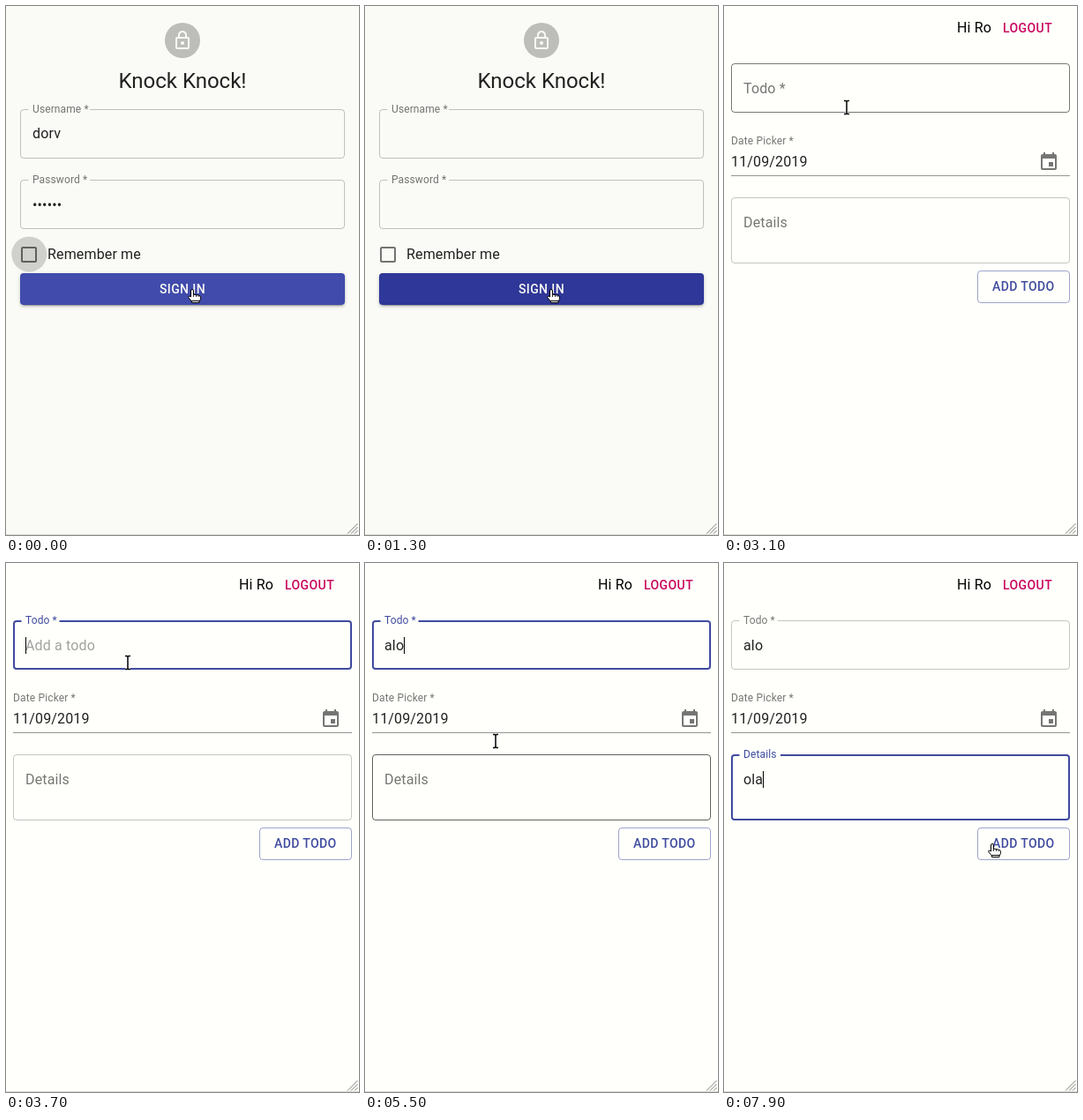
These frames come from a looping animation (400 by 600 pixels, 8 s). An HTML page:

```html
<!DOCTYPE html>
<html lang="en">
<head>
<meta charset="utf-8">
<title>Sign in and add a todo</title>
<style>
  html, body { margin: 0; width: 100%; height: 100%; overflow: hidden; }
  svg { display: block; width: 400px; height: 600px; font: 16px Roboto, sans-serif; letter-spacing: .00938em; }
  .title { font-size: 24px; letter-spacing: 0; }
  .small { font-size: 12px; }
  .button { font-size: 14px; font-weight: 500; letter-spacing: .02857em; }
</style>
</head>
<body>
<svg id="stage" viewBox="0 0 400 600"></svg>
<script>
const LOOP = 8000, STEP = 100;
const INK = 'rgba(0,0,0,.87)', GREY = 'rgba(0,0,0,.54)', INDIGO = '#3f4b9f';
const LOCK = 'M12 17c1.1 0 2-.9 2-2s-.9-2-2-2-2 .9-2 2 .9 2 2 2zm6-9h-1V6c0-2.76-2.24-5-5-5S7 3.24 7 6v2H6c-1.1 0-2 .9-2 2v10c0 1.1.9 2 2 2h12c1.1 0 2-.9 2-2V10c0-1.1-.9-2-2-2zM8.9 6c0-1.71 1.39-3.1 3.1-3.1s3.1 1.39 3.1 3.1v2H8.9V6zM18 20H6V10h12v10z';
const BOX = 'M19 5v14H5V5h14m0-2H5c-1.1 0-2 .9-2 2v14c0 1.1.9 2 2 2h14c1.1 0 2-.9 2-2V5c0-1.1-.9-2-2-2z';
const CALENDAR = 'M17 12h-5v5h5v-5zM16 1v2H8V1H6v2H5c-1.11 0-1.99.9-1.99 2L3 19c0 1.1.89 2 2 2h14c1.1 0 2-.9 2-2V5c0-1.1-.9-2-2-2h-1V1h-2zm3 18H5V8h14v11z';

const stage = document.getElementById('stage');
const pen = document.createElement('canvas').getContext('2d');
const textWidth = s => {
  pen.font = '16px Roboto, sans-serif';
  return pen.measureText(s).width + s.length * .15;
};

const lerp = (a, b, p) => a + (b - a) * p;
const ramp = (t, from, to) => Math.min(1, Math.max(0, (t - from) / (to - from)));
const smooth = p => p * p * (3 - 2 * p);
const easeOut = p => 1 - (1 - p) ** 2.5;

const text = (x, y, s, fill = INK, extra = '') => `<text x="${x}" y="${y}" fill="${fill}" ${extra}>${s}</text>`;
const icon = (x, y, d, fill = GREY) => `<path transform="translate(${x} ${y})" d="${d}" fill="${fill}"/>`;

// Outlined text field; shrink moves the label into the notch of the border.
function field({ x, y, w, h, label, notch, shrink = 1, focused, border = .23, value = '', hint = '', hintAlpha = 0 }) {
  const inset = focused ? 1 : .5, r = 4 - inset;
  const l = x + inset, top = y + inset, right = x + w - inset, bottom = y + h - inset;
  const gap = x + 9.5, gapEnd = lerp(gap, notch, ramp(shrink, 0, .6));
  const d = `M${gapEnd} ${top}H${right - r}a${r} ${r} 0 0 1 ${r} ${r}V${bottom - r}a${r} ${r} 0 0 1 ${-r} ${r}H${l + r}a${r} ${r} 0 0 1 ${-r} ${-r}V${top + r}a${r} ${r} 0 0 1 ${r} ${-r}H${gap}`;
  const left = x + 14, base = y + 34;
  let out = `<path d="${d}" fill="none" stroke="${focused ? INDIGO : `rgba(0,0,0,${border})`}" stroke-width="${inset * 2}"/>`;
  out += text(0, 0, label, focused ? INDIGO : GREY,
    `transform="translate(${left} ${lerp(base, y + 4, shrink)}) scale(${lerp(1, .75, shrink)})"`);
  if (value) out += text(left, base - 1 + (y > 150 || x < 16 ? 1 : 0), value);
  else if (hintAlpha) out += text(left, base, hint, `rgba(0,0,0,${.37 * hintAlpha})`);
  if (focused) out += `<rect x="${Math.round(left + textWidth(value))}" y="${y + 19}" width="1" height="19"/>`;
  return out;
}

function shadow(raised) {
  const rest = [[3, 1, -2, .2], [2, 2, 0, .14], [1, 5, 0, .12]];
  const high = [[5, 5, -3, .2], [8, 10, 1, .14], [3, 14, 2, .12]];
  return rest.map((layer, i) => {
    const [dy, blur, spread, alpha] = layer.map((v, j) => lerp(v, high[i][j], raised));
    return `<rect x="${16 - spread}" y="${303 + dy - spread}" width="${368 + 2 * spread}" height="${36 + 2 * spread}" rx="4" fill="rgba(0,0,0,${alpha})" style="filter:blur(${blur / 2}px)"/>`;
  }).join('');
}

function login(t) {
  const hover = ramp(t, 250, 500), ripple = smooth(ramp(t, 580, 1090));
  const raised = t < 800 ? ramp(t, 550, 780) : 1 - ramp(t, 800, 1050);
  const glow = (.1 + .2 * ripple) * (1 - smooth(ramp(t, 780, 1300)));
  const fill = [[64, 47], [75, 55], [172, 152]].map(([a, b]) => Math.round(lerp(a, b, hover)));
  const filled = t < 1000;
  return `<rect width="400" height="600" fill="#fafbf6"/>
    <circle cx="200" cy="39" r="20" fill="#bdbdb9"/>${icon(188, 27, LOCK, '#fafbf6')}
    ${text(200, 93, 'Knock Knock!', INK, 'class="title" text-anchor="middle"')}
    ${field({ x: 16, y: 117, w: 368, h: 56, label: 'Username *', notch: 95, value: filled ? 'dorv' : '' })}
    ${field({ x: 16, y: 197, w: 368, h: 56, label: 'Password *', notch: 95, value: filled ? '••••••' : '' })}
    <circle cx="26.3" cy="281.5" r="20" fill="rgba(0,0,0,${.17 * (1 - ramp(t, 500, 800))})"/>
    ${icon(14, 270, BOX)}${text(47, 287, 'Remember me')}
    ${shadow(raised)}
    <clipPath id="face"><rect x="16" y="303" width="368" height="36" rx="4"/></clipPath>
    <g clip-path="url(#face)"><rect x="16" y="303" width="368" height="36" fill="rgb(${fill})"/>
    <circle cx="211" cy="321" r="${211 * ripple}" fill="rgba(255,255,255,${glow})"/></g>
    ${text(200, 326, 'SIGN IN', '#fafbf6', 'class="button" text-anchor="middle"')}`;
}

function todos(t) {
  const todo = t < 4600 ? '' : t < 5000 ? 'al' : 'alo';
  const details = 'ola'.slice(0, t < 6700 ? 0 : t < 7100 ? 1 : t < 7500 ? 2 : 3);
  return `<rect width="400" height="600" fill="#fffffb"/>
    ${text(264, 30, 'Hi Ro', '#000')}${text(316, 30, 'LOGOUT', '#c9045f', 'class="button"')}
    ${field({
      x: 8, y: 65, w: 384, h: 56, label: 'Todo *', notch: 60.5, value: todo,
      shrink: easeOut(ramp(t, 3420, 3640)), focused: t >= 3500 && t < 5800,
      border: t < 5800 ? lerp(.23, .87, ramp(t, 3010, 3200)) : .23,
      hint: 'Add a todo', hintAlpha: ramp(t, 3500, 3700)
    })}
    ${text(8, 157, 'Date Picker *', GREY, 'class="small"')}${text(8, 182, '11/09/2019')}
    <rect x="8" y="192" width="384" height="1" fill="rgba(0,0,0,.42)"/>${icon(356, 165, CALENDAR)}
    ${field({
      x: 8, y: 217, w: 384, h: 75, label: 'Details', notch: 64, value: details,
      shrink: easeOut(ramp(t, 5740, 5980)), focused: t >= 5800,
      border: lerp(.23, .87, ramp(t, 5390, 5570)),
      hint: 'Add a description...', hintAlpha: ramp(t, 5800, 6100)
    })}
    <rect x="287.5" y="300.5" width="104" height="36" rx="3.5" fill="none" stroke="rgba(63,75,160,.5)"/>
    ${text(304, 323, 'ADD TODO', INDIGO, 'class="button"')}`;
}

// Pointer stops: time, x, y
const TRACK = [
  [0, 210, 322], [2700, 210, 322], [3100, 139, 115], [3300, 138, 113], [5100, 138, 113],
  [5500, 148, 202], [5600, 146, 259], [7600, 146, 259], [7900, 303, 319], [LOOP, 303, 319]
];
const BEAM = 'M-3-7.5H-1L0-6.5 1-7.5H3M0-6.5V6.5M-3 7.5H-1L0 6.5 1 7.5H3';
const POINTERS = {
  hand: `<g transform="translate(-4 -1)" fill="#fff" stroke="#000">
    <path d="M3.5 9V2a1.5 1.5 0 0 1 3 0V6L12.500 7.200Q14.500 7.600 14.500 9.500V11.500L13 14H4.500L.800 9.800Q.300 8 2 8Z"/>
    <path d="M4.500 13.500H13V15.500H4.500Z"/><path d="M6.500 6V9M9.500 7V9M12 7.500V9" stroke-width=".8"/></g>`,
  arrow: '<path d="M.5.5V15L4 11.800 6.300 17 8.600 16 6.300 11H11Z" fill="#000" stroke="#fff"/>',
  beam: `<g fill="none"><path d="${BEAM}" stroke="#fff" stroke-width="3"/><path d="${BEAM}" stroke="#000" stroke-width="1.500"/></g>`
};

function pointer(t) {
  const i = TRACK.findIndex(stop => stop[0] > t);
  const [t0, x0, y0] = TRACK[i - 1], [t1, x1, y1] = TRACK[i];
  const p = ramp(t, t0, t1);
  const kind = t < 2100 || t >= 7900 ? 'hand' : t < 2800 || t >= 7800 ? 'arrow' : 'beam';
  return `<g transform="translate(${lerp(x0, x1, p)} ${lerp(y0, y1, p)})">${POINTERS[kind]}</g>`;
}

const FRAME = `<path d="M0 599.5H400" stroke="#deded9"/>
  <path d="M387 598.500 398.500 587M391 598.500 398.500 591M395 598.500 398.500 595" stroke="#7d7d7a" fill="none"/>`;

let shown = -1;
function tick() {
  const t = Math.floor(performance.now() % LOOP / STEP) * STEP;
  if (t !== shown) {
    shown = t;
    stage.innerHTML = (t < 2100 ? login(t) : todos(t)) + FRAME + pointer(t);
  }
  requestAnimationFrame(tick);
}
tick();
</script>
</body>
</html>
```
